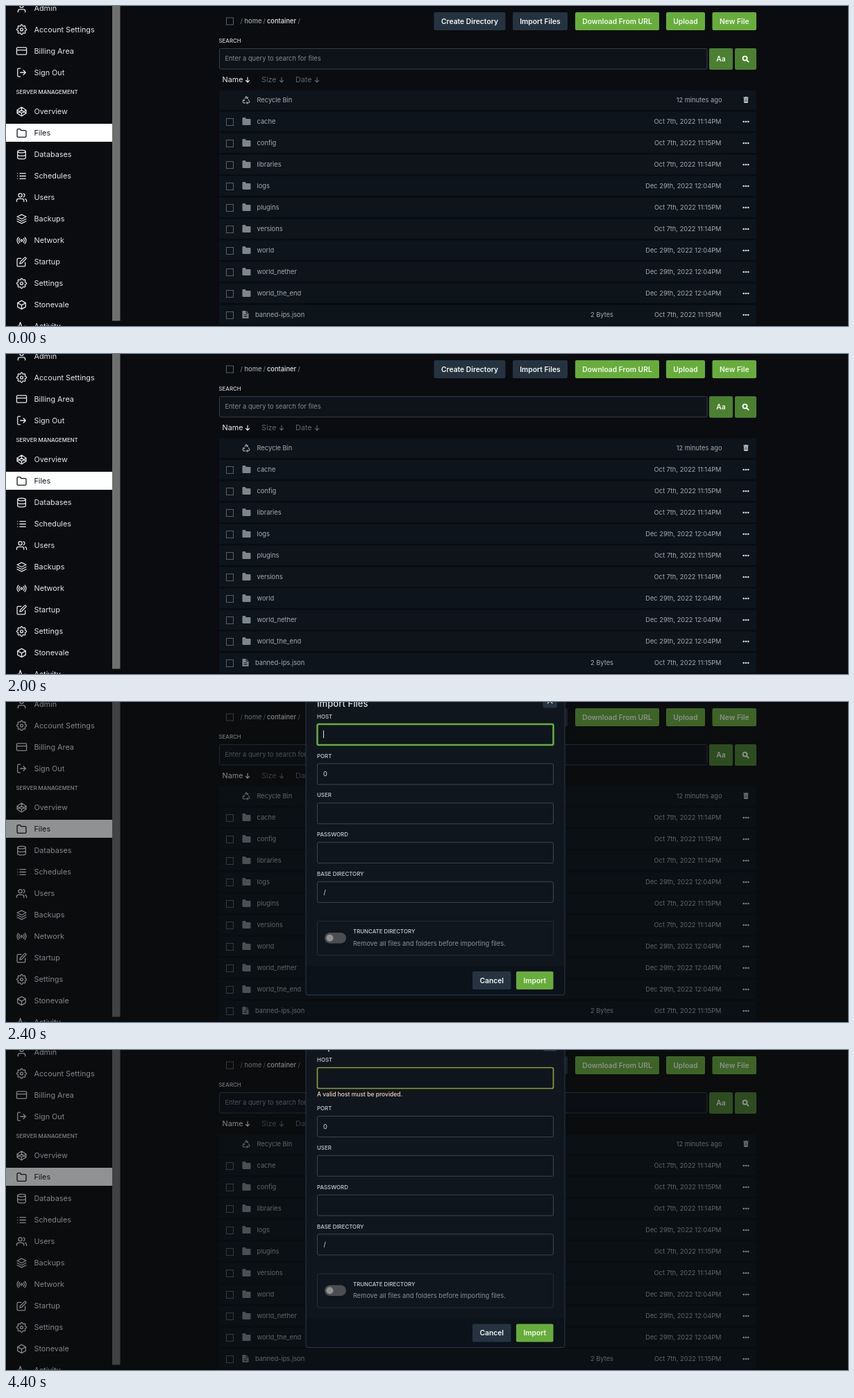
Recreate the animation shown at these times as an HTML page. Size 1213 px wide and 462 px high, loop 4.47 s.

```html
<!DOCTYPE html>
<html lang="en">
<head>
<meta charset="utf-8">
<title>File manager</title>
<style>
html, body { margin: 0; width: 100%; height: 100%; overflow: hidden; background: #0a0c0f; }
svg { display: block; font-family: Inter, sans-serif; }
</style>
</head>
<body>
<svg id="stage" width="1213" height="462" viewBox="0 0 1213 462"></svg>
<script>
const GREEN = '#67ad3b', SLATE = '#24333f', LOOP = 4470;

// Markup helpers; text is placed by the middle of its capitals.
const rect = (x, y, w, h, fill, extra = '') =>
  `<rect x="${x}" y="${y}" width="${w}" height="${h}" fill="${fill}" ${extra}/>`;
const text = (s, x, cy, size, fill, weight = 400, anchor = 'start') =>
  `<text x="${x}" y="${cy + size * .364}" font-size="${size}" fill="${fill}" font-weight="${weight}" text-anchor="${anchor}">${s}</text>`;
const icon = (d, cx, cy, color, scale = .645, style = '') =>
  `<path d="${d}" transform="translate(${cx} ${cy}) scale(${scale}) translate(-12 -12)" fill="none" stroke="${color}" stroke-width="2" stroke-linecap="round" stroke-linejoin="round" ${style}/>`;
const solid = (d, cx, cy, color, scale) =>
  icon(d, cx, cy, color, scale, `style="fill:${color};stroke:none"`);
const button = (label, x, y, w, fill, h = 26) =>
  rect(x, y, w, h, fill, 'rx="2"') + text(label, x + w / 2, y + h / 2, 10.3, '#f4f7f5', 600, 'middle');
const ring = (cx, cy, r) => `M${cx + r} ${cy}a${r} ${r} 0 1 1 ${-2 * r} 0a${r} ${r} 0 1 1 ${2 * r} 0`;
const checkbox = cy => rect(317.5, cy - 5, 10, 10, 'none', 'stroke="#566069"');

function gear() {
  let d = '';
  for (let i = 0; i < 64; i++) {
    const a = i / 64 * 2 * Math.PI, r = 9.6 + 1.4 * Math.cos(8 * a);
    d += `${i ? 'L' : 'M'}${(12 + r * Math.cos(a)).toFixed(2)} ${(12 + r * Math.sin(a)).toFixed(2)}`;
  }
  return d + 'z' + ring(12, 12, 3);
}

const folder = 'M22 19a2 2 0 0 1-2 2H4a2 2 0 0 1-2-2V5a2 2 0 0 1 2-2h5l2 3h9a2 2 0 0 1 2 2z';
const arrow = 'M12 4v16M6 14l6 6 6-6';
const menu = [
  ['Admin', 3, 'M20 21v-2a4 4 0 0 0-4-4H8a4 4 0 0 0-4 4v2' + ring(12, 7, 4)],
  ['Account Settings', 34, gear()],
  ['Billing Area', 65, 'M3 4h18a2 2 0 0 1 2 2v12a2 2 0 0 1-2 2H3a2 2 0 0 1-2-2V6a2 2 0 0 1 2-2zM1 10h22'],
  ['Sign Out', 96, 'M9 21H5a2 2 0 0 1-2-2V5a2 2 0 0 1 2-2h4M16 17l5-5-5-5M21 12H9'],
  ['Overview', 152.5, 'M12 2l10 6.5v7L12 22 2 15.5v-7zM12 22v-6.5M22 8.5l-10 7-10-7M2 15.5l10-7 10 7M12 2v6.5'],
  ['Files', 183.5, folder],
  ['Databases', 214.5, ring(12, 5, 9).replace(/a9 9/g, 'a9 3') + 'M21 12c0 1.66-4 3-9 3s-9-1.34-9-3M3 5v14c0 1.66 4 3 9 3s9-1.34 9-3V5'],
  ['Schedules', 245.5, 'M8 6h13M8 12h13M8 18h13M3 6h.01M3 12h.01M3 18h.01'],
  ['Users', 276.5, 'M17 21v-2a4 4 0 0 0-4-4H5a4 4 0 0 0-4 4v2M23 21v-2a4 4 0 0 0-3-3.87M16 3.13a4 4 0 0 1 0 7.75' + ring(9, 7, 4)],
  ['Backups', 307.5, 'M12 2L2 7l10 5 10-5zM2 17l10 5 10-5M2 12l10 5 10-5'],
  ['Network', 338.5, 'M16.24 7.76a6 6 0 0 1 0 8.49M7.76 16.24a6 6 0 0 1 0-8.49M19.07 4.93a10 10 0 0 1 0 14.14M4.93 19.07a10 10 0 0 1 0-14.14' + ring(12, 12, 2)],
  ['Startup', 369.5, 'M11 4H4a2 2 0 0 0-2 2v14a2 2 0 0 0 2 2h14a2 2 0 0 0 2-2v-7M18.5 2.5a2.12 2.12 0 0 1 3 3L12 15l-4 1 1-4z'],
  ['Settings', 400.5, gear()],
  ['Stonevale', 431.5, 'M21 7.5v9l-9 5-9-5v-9l9-5zM3 7.5l9 5 9-5M12 12.5v9'],
  ['Activity', 462.5, 'M22 12h-4l-3 9L9 3l-3 9H2'],
];

function sidebar() {
  let s = rect(0, 170, 153, 26, '#fff');
  for (const [label, cy, d] of menu) {
    const color = label === 'Files' ? '#12161a' : '#e4e7e9';
    s += icon(d, 22.5, cy, color) + text(label, 40.5, cy, 10.8, color);
  }
  return s + text('SERVER MANAGEMENT', 14.5, 124.5, 7.8, '#e4e7e9', 500) + rect(153, 0, 11.5, 454.5, '#6f6f6f');
}

const OCT = 'Oct 7th, 2022 11:', DEC = 'Dec 29th, 2022 12:04PM';
const files = [
  ['cache', OCT + '14PM'], ['config', OCT + '15PM'], ['libraries', OCT + '14PM'],
  ['logs', DEC], ['plugins', OCT + '15PM'], ['versions', OCT + '14PM'],
  ['world', DEC], ['world_nether', DEC], ['world_the_end', DEC], ['banned-ips.json', OCT + '15PM'],
];

function fileList() {
  const ink = '#a3abb1', grey = '#7d868d';
  let s = rect(307, 121.5, 774, 28.5, '#0d141b')
    + icon('M8.5 9L12 3l3.5 6M18 11.5l3 6-3 2.5h-5M9.500 20H5l-2-3 3-5.500M13 8h3V5M15 17.500l-2 2.500 2 2.500M3.500 13l3-1.500 1.500 3', 346, 135.5, ink, .55)
    + text('Recycle Bin', 361.5, 135.5, 9.3, ink)
    + text('12 minutes ago', 1031.5, 135.5, 9.3, ink, 400, 'end')
    + solid('M4 3h5l1-1h4l1 1h5v3H4zM5 7h14l-1 15H6z', 1066, 135.5, '#d5d9dc', .44)
    + icon('M9.500 10v8M14.500 10v8', 1066, 135.5, '#0d141b', .44);
  files.forEach(([name, date], i) => {
    const cy = 166.5 + 31 * i, isFile = name.includes('.');
    s += rect(307, cy - 14, 774, 28.5, '#0d141b') + checkbox(cy + 1)
      + (isFile
        ? solid('M3 1h11l7 7v15H3z', 345, cy, grey, .5)
          + icon('M8 13h8M8 18h8M14 2v6h6', 345, cy, '#0d141b', .5)
          + text('2 Bytes', 875, cy, 9.3, ink, 400, 'end')
        : solid(folder, 346.5, cy, grey, .6))
      + text(name, isFile ? 359 : 361.5, cy, 9.3, ink) + text(date, 1030.5, cy, 9.3, ink, 400, 'end');
    for (const x of [1062.7, 1066, 1069.3]) s += `<circle cx="${x}" cy="${cy + .5}" r="1.3" fill="#d5d9dc"/>`;
  });
  return s;
}

function header() {
  const dim = '#7b858c', off = '#5d666d';
  let s = checkbox(22);
  [['/', 337.5, dim], ['home', 343.5, '#a3abb1'], ['/', 370.5, dim], ['container', 376, '#e4e7e9'], ['/', 420.5, dim]]
    .forEach(([t, x, c]) => s += text(t, x, 22, 9.3, c, c === dim ? 400 : 500));
  s += button('Create Directory', 616.5, 9, 103, SLATE) + button('Import Files', 730, 9, 79, SLATE)
    + button('Download From URL', 820, 9, 121, GREEN) + button('Upload', 951, 9, 56, GREEN)
    + button('New File', 1017.5, 9, 63.5, GREEN)
    + text('SEARCH', 306.5, 50, 7.9, '#c9ced2', 500)
    + rect(307.5, 61.5, 702.5, 29.5, '#0d1319', 'rx="2" stroke="#333f49"')
    + text('Enter a query to search for files', 315.5, 76, 9.3, '#818b92')
    + button('Aa', 1013, 61, 34, '#4b8030', 31) + button('', 1050, 61, 31, '#4b8030', 31)
    + icon('M15 15l6 6' + ring(10, 10, 6.5), 1065.5, 76.5, '#fff', .46, 'style="stroke-width:4"');
  [['Name', 311.5, 348, '#e8ebed'], ['Size', 368, 397, off], ['Date', 417, 448, off]]
    .forEach(([t, x, ax, c]) => s += text(t, x, 106.5, 10.8, c) + icon(arrow, ax, 106.5, c, .44, 'style="stroke-width:2.600"'));
  return s;
}

const label = (s, cy) => text(s, 448, cy, 7.9, '#c9ced2', 500);
const input = (y, id = '') => rect(448.5, y, 340, 30, '#0f151c', `${id} rx="2" stroke="#3a4650"`);

function modal() {
  let low = '';
  ['PORT', 'USER', 'PASSWORD', 'BASE DIRECTORY'].forEach((name, i) => {
    low += label(name, 77.8 + 56.8 * i) + input(89 + 56.8 * i);
  });
  low += text('0', 457, 104, 9.3, '#dfe3e6') + text('/', 457.5, 274.5, 9.3, '#dfe3e6')
    + rect(448.5, 316.5, 340, 49, 'none', 'rx="2" stroke="#222e38"')
    + rect(459, 333, 31, 15.5, '#4c4d50', 'rx="7.750"') + '<circle cx="466.500" cy="340.750" r="5" fill="#929292"/>'
    + text('TRUNCATE DIRECTORY', 500, 331.5, 7.9, '#c9ced2', 500)
    + text('Remove all files and folders before importing files.', 500, 348.5, 9.3, '#87919a')
    + rect(432.5, 381, 372, 41.5, '#0b1219') + button('Cancel', 672, 389, 55.5, SLATE) + button('Import', 735, 389, 53.5, GREEN);
  return rect(432, -49, 373, 472, '#0f161e', 'id="panel" rx="3"')
    + `<g id="upper">${text('Import Files', 448, 2, 13.1, '#d9dde0', 500)}
      ${rect(773.5, -12, 20.5, 20.5, SLATE, 'rx="3"')}${icon('M6 6l12 12M18 6L6 18', 783.7, -1.5, '#d9dde0', .56)}
      ${label('HOST', 21)}${input(32, 'id="host"')}${rect(457, 41, 1, 11, '#e4e7e9', 'id="caret"')}
      ${text('A valid host must be provided.', 448, 70, 8.5, '#fbd3bd', 500).replace('<text', '<text id="error"')}</g>
    <g id="lower">${low}</g>`
    + rect(432, -49, 373, 472, 'none', 'id="edge" rx="3" stroke="#2c3944"');
}

const stage = document.getElementById('stage');
stage.innerHTML = rect(0, 0, 1213, 462, '#0a0c0f') + sidebar() + header() + fileList()
  + rect(164.5, 0, 1048.5, 462, '#090c0f', 'id="shade"') + rect(0, 0, 164.5, 462, '#090c0f', 'id="sideShade"')
  + `<g id="modal">${modal()}</g>`
  + '<path id="cursor" d="M0 0V9.700L2.300 7.600 3.800 11 5.400 10.300 3.900 7H7z" fill="#fff" stroke="#111" stroke-width=".600"/>';

const el = {};
stage.querySelectorAll('[id]').forEach(n => el[n.id] = n);
const set = (id, attrs) => { for (const k in attrs) el[id].setAttribute(k, attrs[k]); };
const clamp = v => Math.min(1, Math.max(0, v));

// Remaining distance of a spring with stiffness 300, damping 15, unit mass.
function springLeft(ms) {
  if (ms < 0) return 1;
  const t = ms / 1000, w = Math.sqrt(300 - 7.5 ** 2);
  return Math.exp(-7.5 * t) * (Math.cos(w * t) + 7.5 / w * Math.sin(w * t));
}

// [start, end, from, to]
const moves = [
  [2640, 2930, [800, 80], [881, 333]],
  [3230, 3730, [881, 333], [682, 431]],
  [3760, 4190, [682, 431], [-10, 444]],
];
function cursorAt(t) {
  const m = moves.filter(m => t >= m[0]).pop();
  if (!m || t < 2670 || t >= 4190) return null;
  const p = clamp((t - m[0]) / (m[1] - m[0])), e = p * p * (3 - 2 * p);
  return m[2].map((a, i) => a + (m[3][i] - a) * e);
}

function draw(t) {
  const open = t - 2015, left = t >= 2400 ? 0 : springLeft(open), scale = 1 - .25 * left;
  const failed = t >= 4400, shift = failed ? 6.5 : 0;
  set('shade', { opacity: .45 * clamp(open / 150) });
  set('sideShade', { opacity: t >= 2200 ? .45 : 0 });
  set('modal', {
    opacity: clamp(1 - left),
    transform: `translate(618.5 187) scale(${scale}) translate(-618.5 -187)`,
  });
  for (const id of ['panel', 'edge']) set(id, { y: -49 - shift, height: 472 + 2 * shift });
  set('upper', { transform: `translate(0 ${-shift})` });
  set('lower', { transform: `translate(0 ${shift})` });
  set('host', { stroke: failed ? '#8f9c35' : GREEN, 'stroke-width': failed ? 1.7 : 2.5 });
  set('error', { opacity: failed ? 1 : 0 });
  const caret = t < 2530 || (t >= 2830 && t < 3130) || (t >= 3430 && t < 3800);
  set('caret', { opacity: caret ? 1 : 0 });
  const at = cursorAt(t);
  set('cursor', { opacity: at ? 1 : 0, transform: `translate(${at || [0, 0]})` });
}

const start = performance.now();
function tick() {
  draw((performance.now() - start) % LOOP);
  requestAnimationFrame(tick);
}
tick();
</script>
</body>
</html>
```
